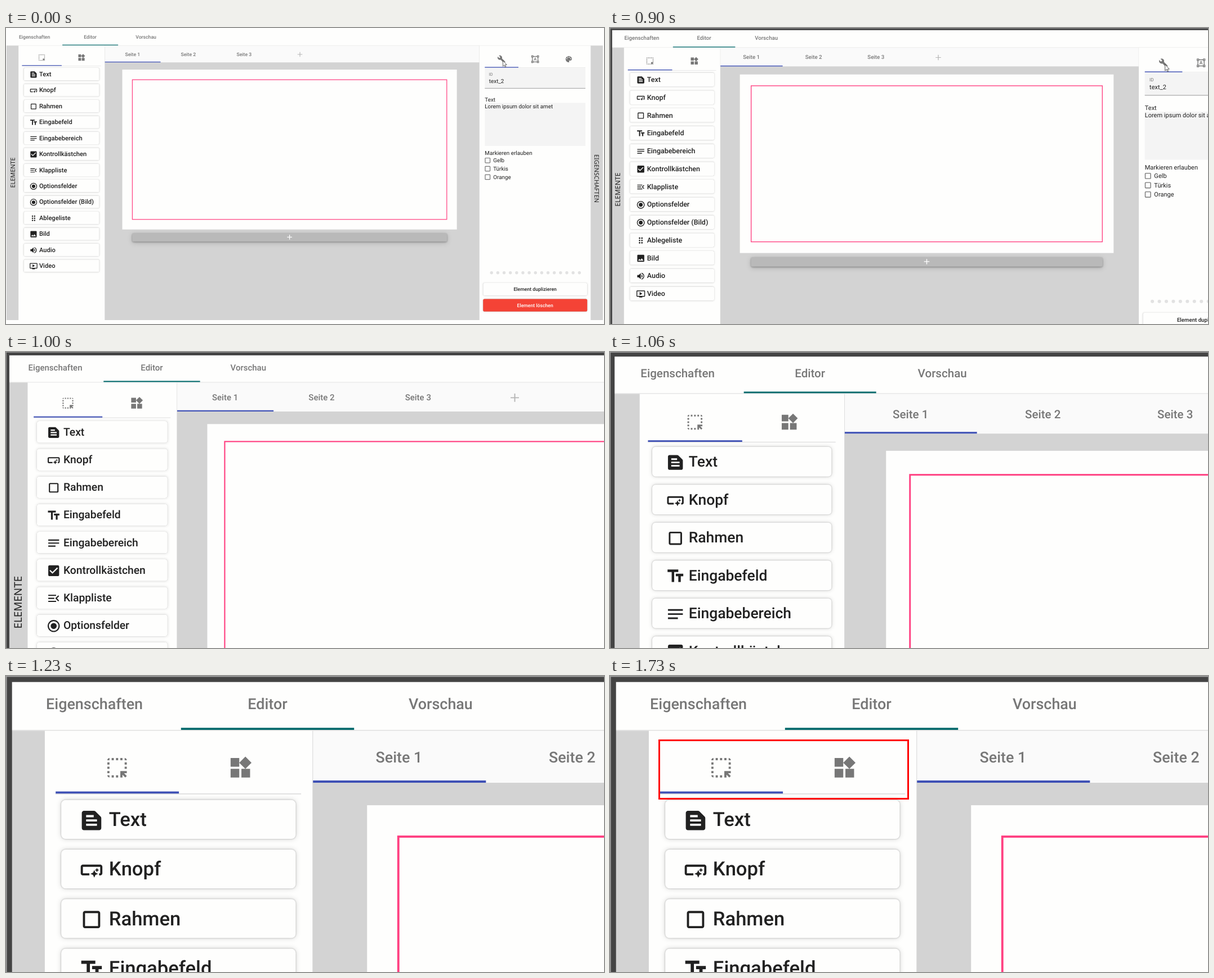
Animation of 1062x527 px, one loop 4200 ms. Source, as an HTML page:

```html
<!DOCTYPE html>
<html lang="de">
<head>
<meta charset="utf-8">
<title>Editor</title>
<style>
  html, body { margin: 0; width: 100%; height: 100%; overflow: hidden; background: #fefefd; }
  svg { display: block; width: 1062px; height: 527px; }
  text { font-family: Roboto, sans-serif; text-rendering: geometricPrecision; white-space: pre; }
  .raised { filter: drop-shadow(0 .8px .45px rgba(0,0,0,.27)) drop-shadow(0 .4px 1.5px rgba(0,0,0,.16)); }
  .floating { filter: drop-shadow(0 1.6px 1.5px rgba(0,0,0,.3)) drop-shadow(0 2px 4px rgba(0,0,0,.16)); }
</style>
</head>
<body>
<svg id="stage" viewBox="0 0 1062 527">
  <g id="world"></g>
  <rect id="marker" x="87.5" y="114.5" width="442" height="104" fill="none" stroke="#f00" stroke-width="3" opacity="0"/>
</svg>
<script>
const LOOP = 4200, START = 830, STEP = 100 / 3;
const ZOOM_STEPS = 12, FADE_FROM = 15, FADE_STEPS = 12, ZOOM = 3.105;
const INK = '#212121', GREY = '#777', LINE = '#e0e0e0', BAR = '#d3d3d3', INDIGO = '#3f51b5';
const PAPER = '#fefefd';

const world = document.getElementById('world');
const marker = document.getElementById('marker');

function add(tag, attrs, text) {
  const node = document.createElementNS('http://www.w3.org/2000/svg', tag);
  for (const key in attrs) node.setAttribute(key, attrs[key]);
  if (text) node.textContent = text;
  return world.appendChild(node);
}
// Filled box given by its left, top, right and bottom edges.
const box = (l, t, r, b, fill, more) =>
  add('rect', { x: l, y: t, width: r - l, height: b - t, fill, ...more });
const label = (x, y, str, size, more) =>
  add('text', { x, y, 'font-size': size, fill: INK, ...more }, str);
const tabLabel = (x, y, str, fill = GREY) =>
  label(x, y, str, 8.66, { 'text-anchor': 'middle', 'font-weight': 500, fill });
const icon = (x, y, d, fill = INK) =>
  add('path', { d, fill, 'fill-rule': 'evenodd', transform: `translate(${x} ${y}) scale(.619)` });
const plus = (x, y, r, stroke, width) =>
  add('path', { d: `M${x - r} ${y}h${2 * r}M${x} ${y - r}v${2 * r}`, stroke, 'stroke-width': width });
const button = (l, t, r, fill = PAPER) =>
  box(l, t, r, t + 22.3, fill, { rx: 2.5, class: 'raised' });
const sideTitle = (x, y, angle, str) =>
  add('text', { transform: `translate(${x} ${y}) rotate(${angle})`, 'text-anchor': 'middle', y: 4,
    'font-size': 10.9, fill: INK, style: 'font-family:"Noto Sans",sans-serif' }, str);
const disc = (x, y, r) => `M${x - r} ${y}a${r} ${r} 0 1 0 ${2 * r} 0a${r} ${r} 0 1 0 ${-2 * r} 0z`;

const radio = disc(12, 12, 10) + disc(12, 12, 8) + disc(12, 12, 5);
const icons = {
  select: 'M17 5h-2V3h2zM15 21h2v-2.59L19.59 21 21 19.59 18.41 17H21v-2h-6zM19 9h2V7h-2zM19 13h2v-2h-2zM11 21h2v-2h-2zM7 5h2V3H7zM3 17h2v-2H3zM5 21v-2H3c0 1.1.9 2 2 2zM19 3v2h2c0-1.1-.9-2-2-2zM11 5h2V3h-2zM3 9h2V7H3zM7 21h2v-2H7zM3 13h2v-2H3zM3 5h2V3c-1.1 0-2 .9-2 2z',
  widgets: 'M13 13h8v8h-8zM3 13h8v8H3zM3 3h8v8H3zM16.66 1.69L11 7.34 16.66 13l5.66-5.66z',
  wrench: 'M22.7 19l-9.1-9.1c.9-2.3.4-5-1.5-6.9-2-2-5-2.4-7.4-1.3L9 6 6 9 1.6 4.7C.4 7.1.9 10.1 2.9 12.1c1.9 1.9 4.6 2.4 6.9 1.5l9.1 9.1c.4.4 1 .4 1.4 0l2.3-2.3c.5-.4.5-1.1.1-1.4z',
  shapes: 'M23 7V1h-6v2H7V1H1v6h2v10H1v6h6v-2h10v2h6v-6h-2V7zM3 3h2v2H3zM3 19h2v2H3zM17 19H7v-2H5V7h2V5h10v2h2v10h-2zM19 19h2v2h-2zM19 3h2v2h-2zM13.73 14h-3.49l-.73 2H7.89l3.4-9h1.4l3.41 9h-1.63zM10.69 12.74h2.61L12 8.91z',
  palette: 'M12 3c-4.97 0-9 4.03-9 9s4.03 9 9 9c.83 0 1.5-.67 1.5-1.5 0-.39-.15-.74-.39-1.01-.23-.26-.38-.61-.38-.99 0-.83.67-1.5 1.5-1.5H16c2.76 0 5-2.24 5-5 0-4.42-4.03-8-9-8z' +
    disc(6.5, 10.5, 1.5) + disc(9.5, 6.5, 1.5) + disc(14.5, 6.5, 1.5) + disc(17.5, 10.5, 1.5)
};
const elements = [
  ['Text', 'M20.41 8.41l-4.83-4.83C15.21 3.21 14.7 3 14.17 3H5C3.9 3 3 3.9 3 5v14c0 1.1.9 2 2 2h14c1.1 0 2-.9 2-2V9.83c0-.53-.21-1.04-.59-1.42zM7 7h7v2H7zM7 15h10v2H7zM7 11h10v2H7z'],
  ['Knopf', 'M22 9v6c0 1.1-.9 2-2 2h-1v-2h1V9H4v6h6v2H4c-1.1 0-2-.9-2-2V9c0-1.1.9-2 2-2h16c1.1 0 2 .9 2 2zM14.5 19l1.09-2.41L18 15.5l-2.41-1.09L14.5 12l-1.09 2.41L11 15.5l2.41 1.09zM17 14l.62-1.38L19 12l-1.38-.62L17 10l-.62 1.38L15 12l1.38.62z'],
  ['Rahmen', 'M18 4H6c-1.1 0-2 .9-2 2v12c0 1.1.9 2 2 2h12c1.1 0 2-.9 2-2V6c0-1.1-.9-2-2-2zM6 6h12v12H6z'],
  ['Eingabefeld', 'M2.5 4v3h5v12h3V7h5V4zM21.5 9h-9v3h3v7h3v-7h3z'],
  ['Eingabebereich', 'M3 18h12v-2H3zM3 6v2h18V6zM3 13h18v-2H3z'],
  ['Kontrollkästchen', 'M19 3H5c-1.11 0-2 .9-2 2v14c0 1.1.89 2 2 2h14c1.11 0 2-.9 2-2V5c0-1.1-.89-2-2-2zM10 17l-5-5 1.41-1.41L10 14.17l7.59-7.59L19 8z'],
  ['Klappliste', 'M3 18h13v-2H3zM3 13h10v-2H3zM3 6v2h13V6zM21 15.59L17.42 12 21 8.41 19.59 7l-5 5 5 5z'],
  ['Optionsfelder', radio],
  ['Optionsfelder (Bild)', radio],
  ['Ablegeliste', [6, 12, 18].map(y => disc(9, y, 2) + disc(15, y, 2)).join('')],
  ['Bild', 'M21 19V5c0-1.1-.9-2-2-2H5c-1.1 0-2 .9-2 2v14c0 1.1.9 2 2 2h14c1.1 0 2-.9 2-2zM8.5 13.5l2.5 3.01L14.5 12l4.5 6H5z'],
  ['Audio', 'M3 9v6h4l5 5V4L7 9zM16.5 12c0-1.77-1.02-3.29-2.5-4.03v8.05c1.48-.73 2.5-2.25 2.5-4.02zM14 3.23v2.06c2.89.86 5 3.54 5 6.71s-2.11 5.85-5 6.71v2.06c4.01-.91 7-4.49 7-8.77s-2.99-7.86-7-8.77z'],
  ['Video', 'M21 3H3c-1.11 0-2 .89-2 2v12c0 1.1.89 2 2 2h5v2h8v-2h5c1.1 0 2-.9 2-2V5c0-1.11-.9-2-2-2zM3 5h18v12H3zM16 11l-7 4V7z']
];

function buildHeader() {
  box(0, 0, 1062, 527, PAPER);
  box(1, 30.9, 1060, 31.4, LINE);
  ['Eigenschaften', 'Editor', 'Vorschau'].forEach((s, i) => tabLabel(50.6 + 99 * i, 19.1, s));
  box(100.1, 29.7, 199.1, 30.9, '#00696b');
}

function buildElements() {
  box(1, 31.4, 22.2, 520, BAR);
  sideTitle(12.2, 257.5, -90, 'ELEMENTE');
  icon(56.1, 45.2, icons.select, GREY);
  icon(126.6, 45.2, icons.widgets, GREY);
  box(28.3, 67.3, 168.8, 67.9, LINE);
  box(28.4, 66.2, 98.9, 67.4, INDIGO);
  elements.forEach(([name, shape], i) => {
    const top = 71.1 + 28.43 * i;
    button(31.6, top, 165.7);
    icon(41.5, top + 4.3, shape);
    label(58.9, top + 14.9, name, 11.14, { 'font-weight': 500 });
  });
}

function buildCanvas() {
  box(175.3, 31.4, 840.8, 520, BAR);
  box(175.6, 31.4, 840.5, 61.2, '#fafafa');
  [1, 2, 3].forEach(n => tabLabel(125.8 + 99 * n, 49.5, 'Seite ' + n));
  plus(522, 47, 4.3, '#b5b5b5', 1.1);
  box(175.6, 59.9, 274.5, 61.2, INDIGO);
  box(206.5, 74.1, 800.7, 358.7, PAPER);
  box(224.4, 92.1, 782.8, 340.8, 'none', { stroke: '#ff4081', 'stroke-width': 1.24 });
  box(224.2, 365.2, 783.2, 380.3, '#b9b9b9', { rx: 2.5, class: 'floating' });
  plus(503.6, 372.4, 4.3, '#fff', 1.2);
}

function buildProperties() {
  box(1038.3, 31.4, 1060, 520, BAR);
  sideTitle(1048.6, 268, 90, 'EIGENSCHAFTEN');
  icon(872.4, 48.1, icons.wrench, GREY);
  icon(932.3, 48.1, icons.shapes, GREY);
  icon(992, 48.1, icons.palette, GREY);
  box(850.3, 70.2, 1029, 70.8, LINE);
  box(850.3, 69.3, 910, 70.6, INDIGO);

  box(850.3, 71.3, 1029, 107.6, '#f4f4f4');
  box(850.3, 106.9, 1029, 107.7, '#8c8c8c');
  label(857.8, 85.4, 'ID', 7.4, { fill: GREY });
  label(857.8, 97.6, 'text_2', 9.9);
  label(850.3, 130.6, 'Text', 9.9);
  box(850.3, 133.4, 1029, 210, '#f4f4f4');
  label(850.3, 142.6, 'Lorem ipsum dolor sit amet', 9.9);
  label(850.3, 225.9, 'Markieren erlauben', 9.9);
  ['Gelb', 'Türkis', 'Orange'].forEach((name, i) => {
    const y = 235.8 + 14.8 * i;
    box(851, y - 4.3, 859.6, y + 4.3, 'none', { rx: .8, stroke: '#757575', 'stroke-width': 1.24 });
    label(865.2, y + 3.5, name, 9.9);
  });

  for (let i = 0; i < 15; i++) add('circle', { cx: 862.3 + 11.14 * i, cy: 435.8, r: 2.7, fill: '#e2e2e2' });
  button(847.3, 454, 1032.2);
  tabLabel(939.7, 468.2, 'Element duplizieren', INK);
  button(847.3, 482.5, 1032.2, '#f44336');
  tabLabel(939.7, 496.7, 'Element löschen', '#fff');
  add('path', { d: 'M882.5 58v10.2l2.3-2.2 1.6 3.7 1.5-.7-1.6-3.5h3z', fill: '#fff', stroke: '#444', 'stroke-width': .8 });
}

buildHeader();
buildElements();
buildCanvas();
buildProperties();
const outline = { stroke: '#a0a0a0', 'stroke-width': 1 };
const edges = [
  box(0, 0, 1062, 527, 'none', outline),
  box(1.95, 1.95, 1060.05, 525.05, 'none', { stroke: '#444', 'stroke-width': 3 })
];

const easeInOut = p => p < .5 ? 2 * p * p : 1 - 2 * (1 - p) ** 2;
const clamp = v => Math.min(1, Math.max(0, v));

function draw(time) {
  const step = Math.floor((time - START + 5) / STEP);
  const active = time >= START;
  const scale = active ? 1 + (ZOOM - 1) * easeInOut(clamp(step / ZOOM_STEPS)) : 1;
  world.setAttribute('transform', `scale(${scale})`);
  for (const edge of edges) edge.setAttribute('visibility', active ? 'visible' : 'hidden');
  marker.setAttribute('opacity', clamp((step - FADE_FROM) / FADE_STEPS));
}

const begin = performance.now();
function tick() {
  draw((performance.now() - begin) % LOOP);
  requestAnimationFrame(tick);
}
tick();
</script>
</body>
</html>
```
